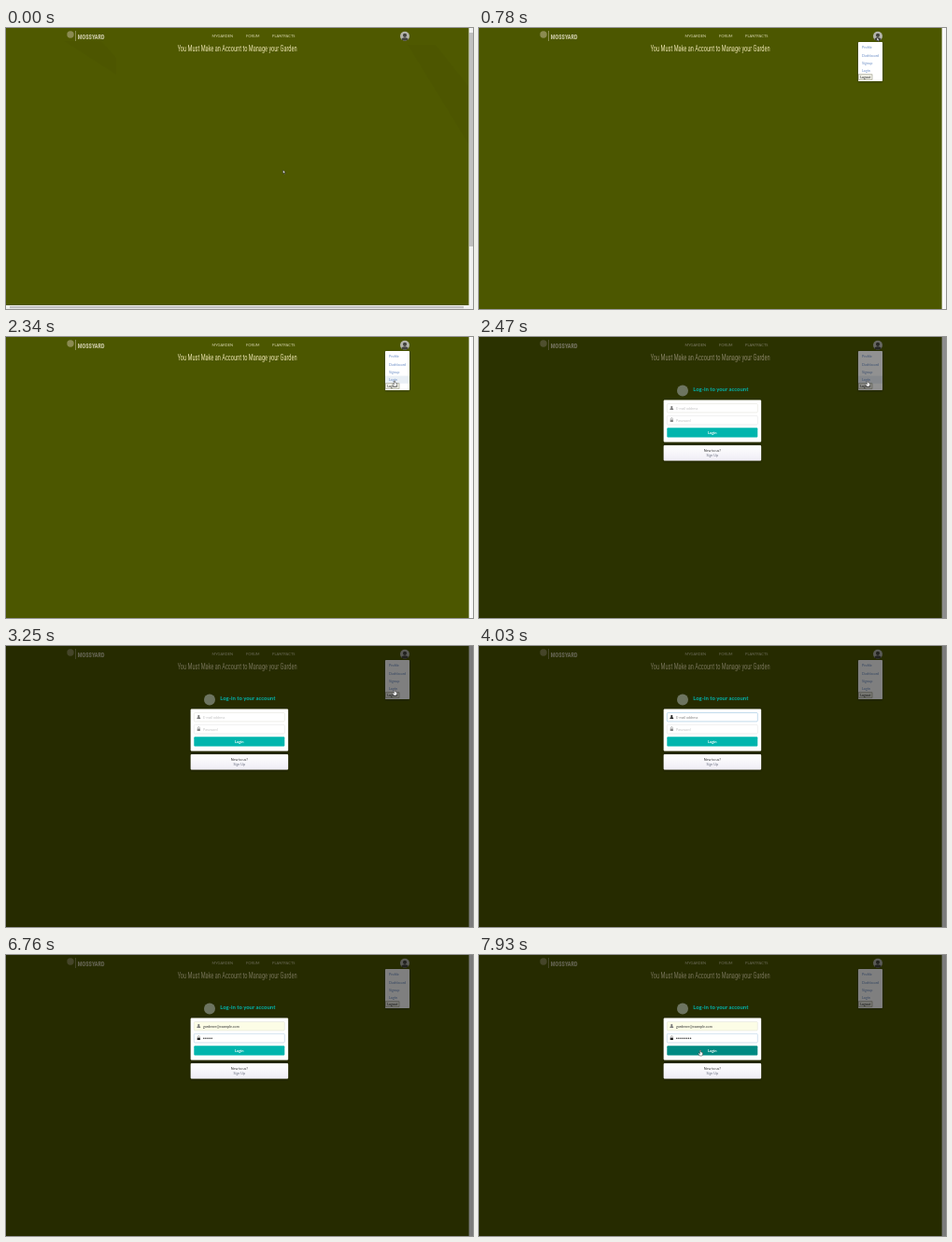
These frames come from a looping animation (500x301 px, 8 s). An HTML page:

```html
<!DOCTYPE html>
<html lang="en">
<head>
<meta charset="utf-8">
<title>Garden log-in</title>
<style>
html, body { margin: 0; width: 100%; height: 100%; overflow: hidden; background: #4c5600; }
svg { display: block; width: 500px; height: 301px; font-family: Lato, sans-serif; }
.narrow { font-family: Roboto, sans-serif; transform: scaleX(.67); }
.nav { font-size: 4px; fill: #d8d6ae; }
.menu { font-size: 3.8px; fill: #6d8fc6; }
.field { font-size: 3.7px; }
.mid { text-anchor: middle; }
</style>
</head>
<body>
<svg viewBox="0 0 500 301">
  <defs>
    <filter id="shadow" x="-20%" y="-20%" width="140%" height="150%">
      <feDropShadow dx="0" dy=".6" stdDeviation=".8" flood-opacity=".4"/>
    </filter>
    <linearGradient id="pale" x2="0" y2="1">
      <stop stop-color="#fff"/><stop offset="1" stop-color="#efedf5"/>
    </linearGradient>
    <clipPath id="disc"><circle cx="427" cy="8.8" r="5"/></clipPath>
  </defs>

  <rect id="page" width="500" height="301"/>
  <g id="shade" opacity=".02">
    <path d="M62 14H102L118 32V50Z"/>
    <path d="M430 18H460L495 62V124Z"/>
  </g>

  <circle cx="69" cy="7" r="3.7" fill="#8b8b52"/>
  <path d="M74.5 3V14" stroke="#a5a575" stroke-width=".7"/>
  <g transform="translate(76.8 11.9)"><text class="narrow" font-size="8" font-weight="800" fill="#cbc9a6">MOSSYARD</text></g>
  <g class="nav">
    <text x="220.5" y="10">MYGARDEN</text>
    <text x="257" y="10">FORUM</text>
    <text x="285" y="10">PLANTFACTS</text>
  </g>
  <g transform="translate(247.6 25)"><text class="narrow mid" font-size="8.4" fill="#ebe3b0">You Must Make an Account to Manage your Garden</text></g>
  <g clip-path="url(#disc)">
    <rect x="421" y="3" width="12" height="12" fill="#b4b4ac"/>
    <circle cx="427" cy="7.8" r="2.1" fill="#44443f"/>
    <ellipse cx="427" cy="13.6" rx="4" ry="3.4" fill="#44443f"/>
  </g>

  <g id="menu">
    <rect x="406" y="15" width="26" height="42" rx=".8" fill="#fff" filter="url(#shadow)"/>
    <rect id="row" x="406" width="26" height="8.2" fill="#e9eff5"/>
    <g class="menu">
      <text x="410" y="22.2">Profile</text>
      <text x="410" y="30.6">Dashboard</text>
      <text x="410" y="38.7">Signup</text>
      <text x="410" y="46.7">Login</text>
    </g>
    <rect x="406.7" y="49.8" width="14.3" height="5.6" fill="#efefe6" stroke="#85856c" stroke-width=".5"/>
    <text x="408.3" y="53.8" font-size="3.6" fill="#222">Logout</text>
  </g>

  <g id="bars">
    <path d="M495.5 0H500V301H0V297H495.5Z" fill="#f1f1f1"/>
    <path d="M496 5H500V234H496ZM4 298H490V300.2H4Z" fill="#c0c0c0"/>
  </g>
  <rect id="edge" x="495.6" width="4.4" height="301" fill="#f8f8f8"/>

  <rect id="dim" width="500" height="301"/>

  <g id="modal">
    <circle cx="218" cy="57.5" r="6" fill="#6d7460"/>
    <text x="229.3" y="58" font-size="5.95" font-weight="700" fill="#00b5ad">Log-in to your account</text>
    <rect x="197.7" y="67.6" width="104.4" height="44.8" rx="1" fill="#fff" filter="url(#shadow)"/>
    <g class="field" stroke-width=".5">
      <rect id="mailBox" x="201.3" y="71.5" width="97" height="9.4" rx="1"/>
      <rect id="passBox" x="201.3" y="84.3" width="97" height="9.6" rx="1"/>
      <g id="mailIcon"><circle cx="206.3" cy="75.1" r="1.1"/><path d="M204.3 78q0-2 2-2t2 2Z"/></g>
      <g id="passIcon"><path d="M204.7 88.6h3.2v2.4h-3.2Z"/><path d="M205.3 88.6v-1a1 1 0 0 1 2 0v1" fill="none" stroke="#777"/></g>
      <text id="mail" x="211" y="77.7"/>
      <text id="pass" x="211" y="90.5"/>
      <g id="dots" fill="#333"/>
    </g>
    <rect id="button" x="201.3" y="97.2" width="97" height="10.2" rx="1"/>
    <text class="mid" x="249.8" y="103.8" font-size="4" font-weight="700" fill="#fff">Login</text>
    <rect x="197.7" y="116" width="104.4" height="16.6" rx="1" fill="url(#pale)" filter="url(#shadow)"/>
    <g class="mid" font-size="3.7">
      <text x="249.8" y="123.1" fill="#333">New to us?</text>
      <text x="249.8" y="128.1" fill="#6b6f80">Sign Up</text>
    </g>
  </g>

  <g id="cursor" stroke-width=".45">
    <path id="arrow" d="M0 0V3.8L.9 3L1.6 4.5L2.3 4.2L1.6 2.8H2.7Z" fill="#fff" stroke="#111"/>
    <path id="hand" d="M-.6 0Q0-.7.6 0V2L2.6 2.5V4.3L1.9 6H-.8L-2.3 3.6L-1.6 3L-.6 3.9Z" fill="#fff" stroke="#222"/>
  </g>
</svg>
<script>
const LOOP = 8000, STEP = 130;
const MAIL = 'gardener@example.com';
const el = Object.fromEntries([...document.querySelectorAll('[id]')].map(e => [e.id, e]));

// [time, x, y] stops of the pointer
const path = [[0, 296.5, 152], [130, 296.5, 152], [780, 426, 10], [1040, 423, 21], [1300, 420, 29],
  [1820, 416, 39], [2210, 416, 47], [3250, 416, 47], [3770, 240, 77], [7540, 240, 77], [7930, 237, 102]];
const mailKeys = [[4160, 1], [4290, 4], [4680, 7], [4940, 11], [5070, 15], [5330, 20]];
const passKeys = [[6240, 2], [6500, 3], [6630, 4], [6760, 5], [6890, 7], [7150, 8]];

const show = (e, on) => e.setAttribute('visibility', on ? 'visible' : 'hidden');
const paint = (e, fill, stroke) => {
  e.setAttribute('fill', fill);
  if (stroke) e.setAttribute('stroke', stroke);
};
const typed = (keys, t) => keys.reduce((n, [at, count]) => t >= at ? count : n, 0);

function pointer(t) {
  const i = path.findIndex(p => p[0] > t);
  if (i < 0) return path.at(-1).slice(1);
  const [a, b] = [path[i - 1], path[i]];
  const u = (t - a[0]) / (b[0] - a[0]);
  const k = u * u * (3 - 2 * u);
  return [1, 2].map(j => a[j] + (b[j] - a[j]) * k);
}

for (let i = 0; i < 8; i++)
  el.dots.insertAdjacentHTML('beforeend', `<circle cx="${211.8 + i * 2.1}" cy="89.2" r=".75"/>`);

function draw(t) {
  const [x, y] = pointer(t);
  const open = t >= 2470;
  paint(el.page, t < 130 ? '#4f5900' : '#4c5700');
  show(el.shade, t < 130);
  show(el.bars, t < 130);
  show(el.edge, t >= 130);

  show(el.menu, t >= 780);
  const row = Math.floor((y - 17) / 8.2);
  show(el.row, t >= 780 && t < 3250 && row >= 0 && row < 4);
  el.row.setAttribute('y', 17 + row * 8.2);

  el.dim.setAttribute('opacity', open ? Math.min(.5, .43 + (t - 2470) / 260 * .07) : 0);
  show(el.modal, open);

  const mailOn = t >= 3900 && t < 5330, passOn = t >= 5330;
  const nMail = typed(mailKeys, t), nPass = typed(passKeys, t);
  paint(el.mailBox, passOn ? '#fcfde6' : '#fff', mailOn ? '#85b7d9' : '#dcdcd4');
  paint(el.passBox, '#fff', passOn ? '#a5c4dc' : '#dedede');
  paint(el.mailIcon, t >= 3900 && t < 5460 ? '#222' : '#777');
  paint(el.passIcon, t >= 5460 ? '#222' : '#888');
  el.mail.textContent = nMail ? MAIL.slice(0, nMail) : 'E-mail address';
  paint(el.mail, nMail ? '#333' : mailOn ? '#858585' : '#c3c3c3');
  el.pass.textContent = nPass ? '' : 'Password';
  paint(el.pass, passOn ? '#909090' : '#c3c3c3');
  [...el.dots.children].forEach((dot, i) => show(dot, open && i < nPass));
  paint(el.button, t >= 7800 ? '#008a82' : '#00b5ad');

  const moving = t < 4030 || t >= 7670;
  const hand = t >= 1040 && t < 3380 || t >= 7800;
  el.cursor.setAttribute('transform', `translate(${x} ${y})`);
  show(el.arrow, moving && !hand);
  show(el.hand, moving && hand);
}

const start = performance.now();
function tick() {
  const t = (performance.now() - start) % LOOP;
  draw(Math.floor(t / STEP) * STEP);
  requestAnimationFrame(tick);
}
tick();
</script>
</body>
</html>
```
